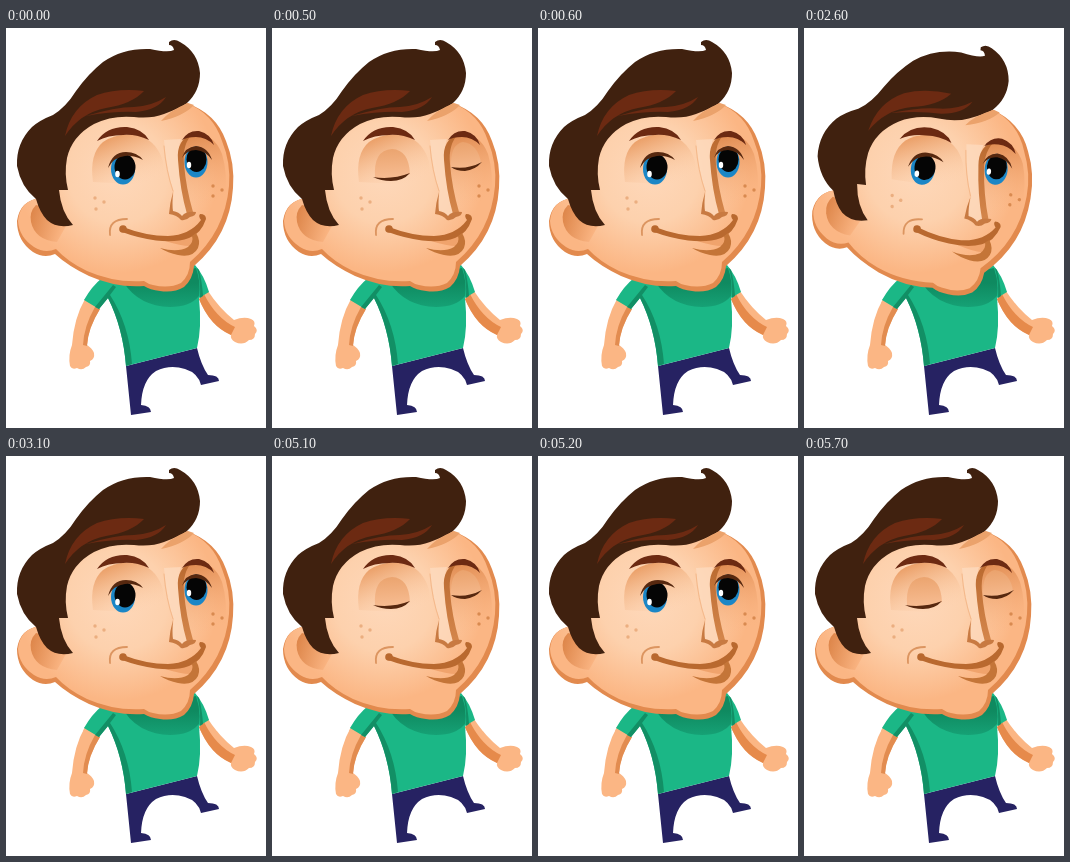
An HTML page that plays this animation: 260 px wide and 400 px high, repeating every 5.8 s.

```html
<!DOCTYPE html>
<html lang="en">
<head>
<meta charset="utf-8">
<title>Blinking boy</title>
<style>
  html, body { margin: 0; width: 100%; height: 100%; overflow: hidden; background: #fff; }
  svg { display: block; width: 260px; height: 400px; }
  .line { fill: none; stroke-linecap: round; stroke-linejoin: round; }
</style>
</head>
<body>
<svg viewBox="0 0 260 400">
  <defs>
    <radialGradient id="skin" gradientUnits="userSpaceOnUse" cx="112" cy="145" r="100">
      <stop offset="0" stop-color="#fed8ba"/>
      <stop offset=".5" stop-color="#fdd1ad"/>
      <stop offset="1" stop-color="#fbb684"/>
    </radialGradient>
    <linearGradient id="socketL" gradientUnits="userSpaceOnUse" x1="104" y1="106" x2="126" y2="160">
      <stop offset="0" stop-color="#e8985e"/>
      <stop offset="1" stop-color="#fdd0ab" stop-opacity="0"/>
    </linearGradient>
    <linearGradient id="socketR" gradientUnits="userSpaceOnUse" x1="180" y1="104" x2="200" y2="178">
      <stop offset="0" stop-color="#dc8549"/>
      <stop offset="1" stop-color="#fbb684" stop-opacity="0"/>
    </linearGradient>
    <linearGradient id="noseSide" gradientUnits="userSpaceOnUse" x1="0" y1="106" x2="0" y2="188">
      <stop offset="0" stop-color="#b9692f"/>
      <stop offset="1" stop-color="#d5874c"/>
    </linearGradient>
    <linearGradient id="lid" x1=".4" y1="0" x2=".6" y2="1">
      <stop offset="0" stop-color="#e9a069"/>
      <stop offset="1" stop-color="#f9c097"/>
    </linearGradient>
    <linearGradient id="earHole" x1="0" y1=".2" x2="1" y2=".5">
      <stop offset="0" stop-color="#dd8549"/>
      <stop offset="1" stop-color="#fbb684"/>
    </linearGradient>
    <linearGradient id="collar" gradientUnits="userSpaceOnUse" x1="0" y1="255" x2="0" y2="280">
      <stop offset="0" stop-color="#0f8a60"/>
      <stop offset="1" stop-color="#16a276"/>
    </linearGradient>
  </defs>

  <g id="body">
    <path fill="#fbb684" d="M79 271Q68 290 66 317Q62 327 64 338Q66 342 71 340Q76 343 80 339Q85 338 84 333Q89 331 88 325Q86 320 81 317Q82 300 94 281Z"/>
    <path fill="#e28c50" d="M94 281Q82 300 81 318L77 317Q78 298 89 279Z"/>
    <path fill="#fbb684" d="M202 263Q213 280 228 292Q238 288 245 291Q250 293 248 298Q253 302 249 306Q249 312 243 312Q237 318 229 314Q224 311 225 307Q204 298 193 271Z"/>
    <path fill="#e68a4b" d="M193 271Q204 298 225 307L229 299Q210 290 198 266Z"/>
    <path fill="#262262" d="M120 338L191 320Q195 337 202 347Q213 347 213 353L195 357Q192 345 179 341Q164 336 150 343Q136 352 135 377Q145 378 145 384L125 387Z"/>
    <path fill="#1bb786" d="M96 250Q86 258 78 272L93 281L102 270Q117 300 120 338L191 320Q196 300 193 270L203 264Q198 247 189 237Z"/>
    <path fill="#128f65" d="M107 257L89 279L93 281L102 270Q117 300 120 338L126 336Q123 296 104 267L110 259ZM191 240Q195 254 194 270L197 268Q196 253 193 242Z"/>
    <path fill="url(#collar)" d="M118 255Q133 278 164 279Q184 279 193 268Q195 254 190 240Z"/>
  </g>

  <g id="head">
    <path fill="#e28a4e" d="M60 90L180 75Q210 85 220 113Q229 135 227 160Q224 207 188 238Q187 251 178 259Q168 265 154 263Q144 262 138 258Q110 260 83 248Q62 238 49 226Q38 231 27 224Q11 213 11 193Q14 172 35 170Z"/>
    <path fill="url(#skin)" d="M60 90L180 75Q207 85 216 113Q225 135 223 158Q219 204 184 234Q184 247 175 255Q163 261 147 257Q142 256 138 253Q108 255 81 243Q62 234 50 221Q39 226 28 219Q13 209 12 193Q14 172 35 170Z"/>
    <path fill="url(#earHole)" d="M30 177Q23 184 25 194Q29 212 51 214L60 198L42 180Z"/>

    <path fill="url(#socketL)" d="M87 154Q83 126 97 114Q113 103 135 108Q152 115 157 134L159 158Z"/>
    <path fill="url(#socketR)" d="M180 184L173 130Q173 112 187 105Q208 105 216 126Q222 146 219 170Z"/>
    <path fill="#feddc2" d="M158 112Q161 145 168 164L164 184L176 189L183 183L174 142Q171 122 175 111Z" opacity=".7"/>
    <path class="line" stroke="#f4b88a" d="M158 118Q160 143 167 163"/>
    <path fill="url(#noseSide)" d="M187 105Q170 112 172 132Q174 162 181 186L187 184Q180 160 178 136Q176 116 187 105Z"/>
    <path fill="#c87a42" d="M167 164Q166 177 167 183Q173 184 176 188Q180 183 190 184Q190 188 184 189Q180 193 175 192Q171 187 163 186Q164 174 167 164Z"/>

    <g id="open">
      <ellipse cx="117" cy="141" rx="12" ry="15.5" fill="#1b86c6"/>
      <ellipse cx="119" cy="139" rx="10.5" ry="12.5" fill="#050505"/>
      <ellipse cx="111.5" cy="146" rx="2.3" ry="3.2" fill="#fff"/>
      <ellipse cx="190" cy="134" rx="11.5" ry="15.5" fill="#1b86c6"/>
      <ellipse cx="190.5" cy="131.5" rx="10" ry="12.5" fill="#050505"/>
      <ellipse cx="183" cy="137" rx="2.2" ry="3.2" fill="#fff"/>
      <path fill="#57280f" d="M102 140Q106 124 120 124Q131 124 137 132Q127 127 119 128Q108 129 102 140ZM176 130Q179 119 190 118Q202 119 206 132Q200 123 190 122Q181 122 176 130Z"/>
    </g>
    <g id="closed">
      <path fill="url(#lid)" d="M103 150Q101 122 120 121Q137 122 138 146Q121 155 103 150ZM179 140Q178 116 191 114Q206 116 209 135Q194 144 179 140Z"/>
      <path fill="#57280f" d="M101 149Q120 152 138 145Q131 153 119 153Q109 153 101 149ZM179 139Q195 142 210 134Q203 142 193 143Q184 143 179 139Z"/>
    </g>
    <path fill="#6c2a12" d="M91 113Q101 98 121 99Q137 101 143 112Q130 106 117 107Q102 107 91 113ZM176 112Q182 102 193 103Q205 106 208 117Q200 109 190 109Q181 109 176 112Z"/>

    <g id="freckles" fill="#d98a50"></g>
    <path class="line" stroke="#dc9560" stroke-width="1.8" d="M104 207Q102 191 121 191"/>
    <circle cx="117" cy="201" r="3.8" fill="#b9692f"/>
    <path fill="#f0a36c" d="M159 213Q173 213 187 207Q189 213 184 218Q175 218 159 213Z"/>
    <path fill="#b9692f" d="M117 199Q140 208 162 208Q184 207 195 192Q192 188 194 186Q200 186 200 191Q195 206 183 210Q170 215 150 212.500Q132 210 116 204Z"/>
    <path fill="#c47538" d="M190 205Q195 213 192 220Q187 230 172 227Q162 225 154 220Q172 225 182 219Q188 214 186 208Z"/>

    <path fill="#40210f" d="M163 14Q168 10 174 14Q192 24 194 45Q194 63 181 75Q174 80 158 86Q145 91 128 89Q106 87 88 96Q66 108 61 130Q58 146 62 162L53 162Q55 184 67 197Q51 201 41 192Q34 185 30 171Q15 159 11 138Q10 115 26 99Q34 92 47 87Q60 79 70 63Q82 46 97 34Q117 20 144 21Q162 25 168 22Q167 17 163 17Z"/>
    <path fill="#6c2a12" d="M59 108Q65 79 91 67Q112 60 138 63Q126 76 100 80Q74 85 59 108ZM80 88Q109 79 128 79Q146 78 160 69Q152 82 130 84Q108 83 80 88Z"/>
    <path fill="#eba26b" d="M155 93Q163 83 182 75L188 77Q178 88 155 93Z"/>
  </g>
</svg>
<script>
  const LOOP = 5800;
  const BLINKS = [[500, 600], [5100, 5200], [5700, 5800]];
  const TILT = [2600, 3100];
  const FRECKLES = [[89, 170], [98, 174], [90, 181], [207, 158], [216, 162], [207, 168]];

  const el = id => document.getElementById(id);
  const within = (t, [from, to]) => t >= from && t < to;

  // The freckles on the lit cheek are fainter.
  el('freckles').innerHTML = FRECKLES
    .map(([x, y]) => `<circle cx="${x}" cy="${y}" r="1.7" opacity="${x < 150 ? 0.5 : 1}"/>`).join('');

  function render(t) {
    const blinking = BLINKS.some(span => within(t, span));
    el('open').style.display = blinking ? 'none' : '';
    el('closed').style.display = blinking ? '' : 'none';
    el('head').setAttribute('transform', `rotate(${within(t, TILT) ? 5.5 : 0} 115 160)`);
  }

  const start = performance.now();
  function tick() {
    render((performance.now() - start) % LOOP);
    requestAnimationFrame(tick);
  }
  tick();
</script>
</body>
</html>
```
